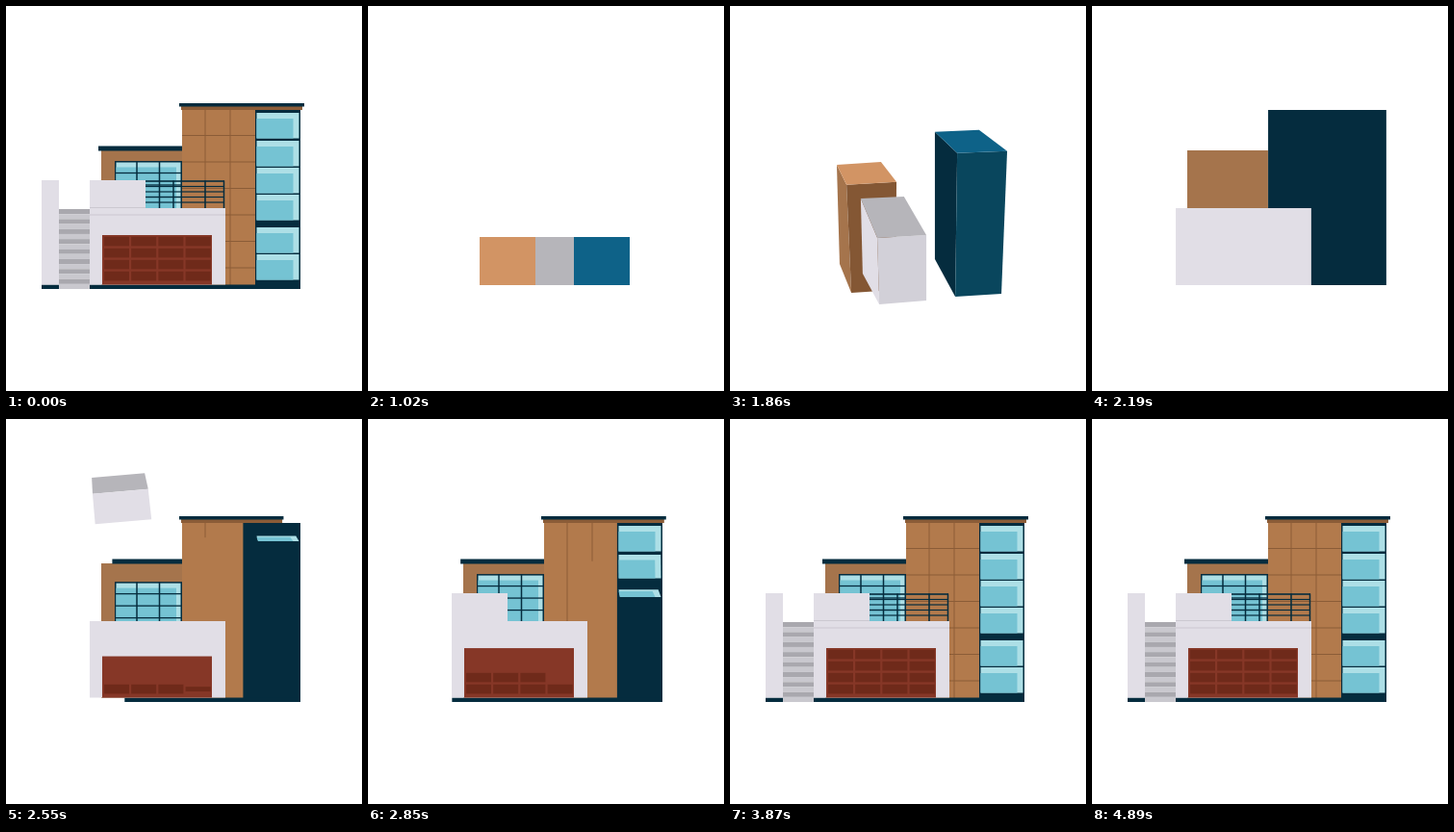
An HTML page with a canvas that plays this animation: 370 px wide and 400 px high, repeating every 4920 ms.

```html
<!DOCTYPE html>
<html lang="en">
<head>
<meta charset="utf-8">
<title>House build</title>
<style>
  html, body { margin: 0; width: 100%; height: 100%; overflow: hidden; background: #fff; }
  canvas { display: block; width: 370px; height: 400px; }
</style>
</head>
<body>
<canvas id="stage" width="370" height="400"></canvas>
<script>
const ctx = document.getElementById('stage').getContext('2d');
const LOOP = 4920;
const NAVY = '#052c3e', WHITE = '#e1dee6', LINE = '#8b5c37';
const GLASS = '#addfe6', GLASS_DARK = '#75c3d3';

const clamp = v => Math.max(0, Math.min(1, v));
const span = (t, start, length) => clamp((t - start) / length);
const outCubic = u => 1 - (1 - u) ** 3;
const inOut = u => u < 0.5 ? 2 * u * u : 1 - 2 * (1 - u) ** 2;
const outBack = u => 1 + 2.9 * (u - 1) ** 3 + 1.9 * (u - 1) ** 2;

function rect(color, x0, y0, x1, y1) {
  if (x1 <= x0 || y1 <= y0) return;
  ctx.fillStyle = color;
  ctx.fillRect(x0, y0, x1 - x0, y1 - y0);
}

function poly(color, ...pts) {
  ctx.fillStyle = color;
  ctx.beginPath();
  for (const [x, y] of pts) ctx.lineTo(x, y);
  ctx.fill();
}

const hline = (color, x0, x1, y, w = 1) => rect(color, x0, y - w / 2, x1, y + w / 2);
const vline = (color, x, y0, y1, w = 1) => rect(color, x - w / 2, y0, x + w / 2, y1);

// Corners: top back-left, back-right, front-right, front-left,
// then bottom front-left, front-right, back-left.
const plan = (x, w) =>
  [x, 240, x + w, 240, x + w, 290, x, 290, x, 290, x + w, 290, x, 240];
const elevation = (x, y, r) =>
  [x, y, x, y, r, y, r, y, r, 290, r, 290, x, 290];

const KEYS = [1110, 1440, 1860, 2200];
const blocks = [
  {
    top: '#d29464', front: '#845734', side: '#a5744c',
    poses: [
      plan(116, 58),
      [122, 211, 170, 222, 153, 280, 104, 268, 110, 290, 155, 300, 126, 232],
      [111, 165, 157, 162, 173, 183, 121, 186, 126, 298, 172, 295, 114, 268],
      elevation(99, 150, 183)
    ]
  },
  {
    top: '#0e6288', front: '#09465d', side: NAVY,
    poses: [
      plan(214, 58),
      [239, 204, 288, 216, 271, 284, 222, 271, 220, 288, 266, 299, 237, 222],
      [213, 131, 259, 129, 288, 151, 236, 153, 234, 302, 282, 299, 213, 263],
      elevation(183, 108, 306)
    ]
  },
  {
    top: '#b6b5ba', front: '#d2d0d8', side: WHITE,
    poses: [
      plan(174, 40),
      [173, 215, 221, 226, 203, 294, 157, 281, 153, 299, 201, 310, 172, 230],
      [136, 200, 181, 198, 204, 238, 153, 241, 155, 310, 204, 306, 138, 278],
      elevation(87, 210, 228)
    ]
  }
];

// Smooth curve through the block poses, at rest at both ends.
function poseAt(poses, t) {
  const last = KEYS.length - 1;
  let i = 0;
  while (i < last - 1 && t >= KEYS[i + 1]) i++;
  const length = KEYS[i + 1] - KEYS[i];
  const u = span(t, KEYS[i], length);
  const slope = (k, c) => k === 0 || k === last ? 0
    : (poses[k + 1][c] - poses[k - 1][c]) / (KEYS[k + 1] - KEYS[k - 1]) * length;
  return poses[i].map((a, c) => {
    const b = poses[i + 1][c];
    return a + (b - a) * u * u * (3 - 2 * u)
      + slope(i, c) * u * (1 - u) ** 2 - slope(i + 1, c) * u * u * (1 - u);
  });
}

function drawBlock(block, t) {
  const c = poseAt(block.poses, t);
  const pt = i => [c[2 * i], c[2 * i + 1]];
  const face = (color, ...ids) => poly(color, ...ids.map(pt));
  face(block.side, 0, 3, 4, 6);
  face(block.front, 3, 2, 5, 4);
  face(block.top, 0, 1, 2, 3);
}

function drawPlan(t) {
  const grow = outCubic(span(t, 190, 400));
  const spread = 58 * outBack(span(t, 600, 400));
  if (t >= 600) {
    rect('#d29464', 174 - spread, 240, 174, 290);
    rect('#0e6288', 214, 240, 214 + spread, 290);
  }
  rect('#b6b5ba', 194 - 20 * grow, 265 - 25 * grow, 194 + 20 * grow, 265 + 25 * grow);
}

function drawLeftWindow(p) {
  const y = 210 - 49 * p;
  if (p <= 0) return;
  rect(NAVY, 113, y, 183, 210);
  rect(GLASS, 114.5, y + 1.5, 181.5, 210);
  rect(GLASS_DARK, 114.5, y + 6.5, 177, 210);
  for (const x of [136, 159.5]) vline(NAVY, x, y, 210, 1.5);
  for (let row = 1; row < 4; row++) {
    const ly = y + 12.5 * row;
    if (ly < 210) hline(NAVY, 113, 183, ly, 1.3);
  }
}

function drawTower(t, p) {
  const right = 183 + 76 * p;
  rect('#b27a4c', 183, 108, right, 290);
  vline(LINE, 207, 108, 108 + 182 * inOut(span(t, 2400, 740)));
  vline(LINE, 233, 108, 108 + 182 * inOut(span(t, 2600, 760)));
  const h = inOut(span(t, 2838, 600));
  [134.5, 162, 189.5, 217, 244.5, 272].forEach((y, i) => {
    const end = i < 3 ? 183 : 228;
    hline(LINE, 259 - (259 - end) * h, 259, y);
  });

  [111, 140, 168, 196, 230, 258].forEach((y, i) => {
    const q = outCubic(span(t, 2528 + 145 * i, 300));
    if (q <= 0) return;
    const half = 13.2 * q, mid = y + 13.2, skew = 4 * (1 - q);
    poly(GLASS, [260.5, mid - half], [304.5 - skew, mid - half],
      [304.5, mid + half], [260.5 + skew / 2, mid + half]);
    poly(GLASS_DARK, [260.5, mid - half + 6 * q], [298.5 - skew, mid - half + 6 * q],
      [298.5, mid + half], [260.5 + skew / 2, mid + half]);
  });
}

function drawGarage(t, p) {
  rect('#863727', 100, 289.5 - 51.5 * p, 214, 289.5);
  for (let k = 0; k < 16; k++) {
    const q = span(t, 2249 + 86 * k, 86);
    const row = 3 - Math.floor(k / 4);
    const col = row > 1 ? k % 4 : 3 - k % 4;
    const x = 102 + 28.2 * col, mid = 244.6 + 12 * row;
    rect('#6f2a1a', x, mid - 4.8 * q, x + 26, mid + 4.8 * q);
  }
}

function drawRailing(p) {
  if (p <= 0) return;
  const end = 145 + 82 * p;
  for (let i = 0; i < 5; i++) hline(NAVY, 145, end, 182 + 5.5 * i, i ? 1.2 : 1.6);
  for (const x of [29, 62, 81.5]) vline(NAVY, 145 + x * p, 181.5, 210, 1.5);
}

function drawFallingBox(t) {
  const u = span(t, 2250, 480);
  if (u <= 0) return;
  const left = 1 - u, depth = 45 * left;
  ctx.save();
  ctx.translate(87 + 8 * left, -40 + 221 * u ** 1.35);
  ctx.rotate(-13 * left * Math.PI / 180);
  poly('#b6b5ba', [0, 0], [58, 0], [58 - 6 * left, -depth], [1.5 * left, -depth]);
  poly(WHITE, [0, 0], [58, 0], [58 + 2 * left, 29 + 7 * left], [0, 29 + 7 * left]);
  ctx.restore();
}

function drawHouse(t) {
  const p = outCubic(span(t, 2240, 690));
  const side = inOut(span(t, 2940, 600));
  const wall = 87 - 50 * side;

  rect('#a5744c', 99, 150, 183, 290);
  drawLeftWindow(p);
  rect(NAVY, 183 - 87 * p, 145.5, 183, 150.5);

  rect(NAVY, 183, 108, 306, 290);
  drawTower(t, p);
  rect('#8b5c37', 182, 104, 182 + 126 * p, 108);
  rect(NAVY, 180, 101, 180 + 130 * p, 104.5);

  rect(NAVY, Math.min(306 - 219 * p, side ? wall : 306), 289.5, 306, 294);
  if (side > 0) {
    rect(WHITE, wall, 181, Math.min(87, wall + 18), 289.5);
    for (let i = 0; i < 16; i++) {
      const y = 211 + 5.19 * i;
      rect(i % 2 ? '#c9c8ce' : '#a9a8ae', wall + 18, y, 87, y + 5.19);
    }
  }

  drawRailing(side);
  rect(WHITE, 87, 210, 228, 289.5);
  hline('#cbc8d1', 87, 87 + 141 * side, 217);
  drawGarage(t, p);
  drawFallingBox(t);
  hline('#cbc8d1', 87, 87 + 58 * side, 209.5);
}

function draw(t) {
  rect('#fff', 0, 0, 370, 400);
  if (t < 60) drawHouse(LOOP);
  else if (t < KEYS[0]) drawPlan(t);
  else if (t < KEYS[3]) blocks.forEach(b => drawBlock(b, t));
  else drawHouse(t);
}

const start = performance.now();
function tick() {
  draw((performance.now() - start) % LOOP);
  requestAnimationFrame(tick);
}
tick();
</script>
</body>
</html>
```
